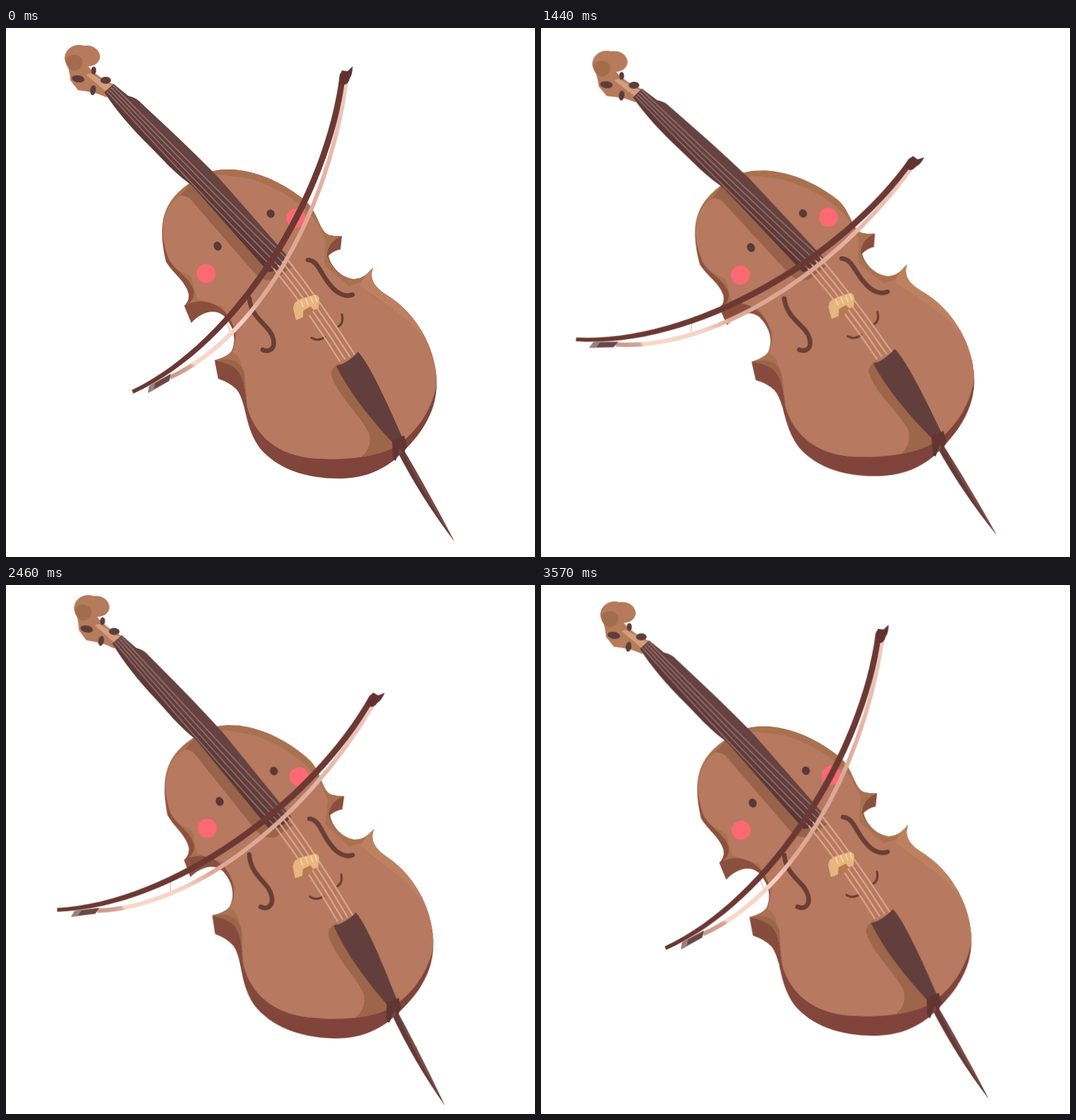
Recreate the animation shown at these times as an HTML page. Size 748 by 748 pixels, loop 3.6 s.

```html
<!DOCTYPE html>
<html lang="en">
<head>
<meta charset="utf-8">
<title>Cello</title>
<style>
  html, body { margin: 0; width: 100%; height: 100%; overflow: hidden; background: #fff; }
  svg { display: block; width: 100vw; height: 100vh; }
  #cello { transform-origin: 362px 382px; }
  #bow { transform-origin: 334px 285px; }
  .line { fill: none; stroke-linecap: round; }
</style>
</head>
<body>
<svg viewBox="0 0 748 748">
  <defs>
    <linearGradient id="hair" gradientUnits="userSpaceOnUse" x1="232" y1="494" x2="482" y2="80">
      <stop offset="0" stop-color="#c9988a"/>
      <stop offset=".06" stop-color="#d3a597"/>
      <stop offset=".07" stop-color="#f8d9c9"/>
      <stop offset=".25" stop-color="#f6d0c3"/>
      <stop offset=".33" stop-color="#dfa998"/>
      <stop offset=".6" stop-color="#dda795"/>
      <stop offset="1" stop-color="#f0cbc1"/>
    </linearGradient>
    <linearGradient id="side" x1="0" y1="0" x2=".6" y2="1">
      <stop offset="0" stop-color="#91573f"/>
      <stop offset="1" stop-color="#7f433b"/>
    </linearGradient>
    <linearGradient id="board" gradientUnits="userSpaceOnUse" x1="218" y1="190" x2="243" y2="165">
      <stop offset="0" stop-color="#593634"/>
      <stop offset="1" stop-color="#664340"/>
    </linearGradient>
    <clipPath id="plateClip"><use href="#plate"/></clipPath>
  </defs>

  <g id="cello">
    <!-- endpin -->
    <path fill="#633a38" d="M553 598L561 594Q600 660 634 726Q588 666 553 598Z"/>
    <path fill="#7d4a44" d="M560 596Q600 660 634 726Q596 667 560 596Z"/>

    <!-- ribs and front plate -->
    <path fill="url(#side)" d="M262 218C285 200 303 200 320 200C365 203 405 228 425 246C442 262 443 290 458 293
      Q467 295 475 294L473 313Q463 315 456 322C460 341 478 354 492 355C505 355 512 346 519 339
      C514 352 518 364 536 376C580 402 608 452 609 502C609 551 578 584 550 610C524 631 497 637 470 637
      C425 637 384 624 359 594C336 562 341 530 326 511Q316 501 300 496L295 470Q313 465 319 457
      C327 438 321 421 308 407C294 396 276 402 262 417L252 393Q260 385 258 375C253 357 235 346 226 330
      C216 285 216 248 262 218Z"/>
    <path id="plate" fill="#a9714f" d="M262 218C285 200 303 200 320 200C365 203 405 228 425 246C442 262 443 290 458 293
      Q467 295 475 294Q456 302 454 320C458 341 478 354 492 355C505 355 512 346 519 339
      C514 352 518 364 536 376C580 402 608 452 609 502C603 541 578 575 548 593C520 608 470 612 430 608
      C376 602 349 568 341 535C338 510 337 486 318 477Q308 472 295 470Q313 465 319 457
      C329 438 323 415 308 400C292 385 272 383 256 391Q268 383 265 370C258 350 237 343 229 324
      C216 285 216 248 262 218Z"/>
    <g clip-path="url(#plateClip)">
      <path fill="#b7795f" d="M247 237C225 250 220 275 222 305L234 337L262 352L270 383L307 394L327 430L321 459
        C333 465 337 482 335 508L340 620L500 625L620 560L612 470C596 430 565 406 534 389Q507 374 501 359
        L485 365L450 335L452 300L440 276C421 247 385 226 345 213L302 207Z"/>
      <path fill="#bd8160" d="M519 338Q505 352 501 363C528 390 563 399 591 440L575 395Z"/>
      <path fill="#99624a" d="M262 218L247 237Q258 236 266 248L350 345Q362 360 380 356L404 338L380 318Z"/>
      <path fill="#9d6549" d="M471 474Q457 482 461 494C474 526 501 548 513 572Q519 592 503 606L560 600L552 570Z"/>
      <path fill="#9c6548" d="M295 470Q330 463 337 488L341 535L318 490Z"/>
    </g>

    <!-- face -->
    <g fill="#583937">
      <ellipse cx="299" cy="308.500" rx="5.500" ry="6.500" transform="rotate(-25 299 308)"/>
      <ellipse cx="374" cy="262.500" rx="5.500" ry="6" transform="rotate(-25 374 262)"/>
    </g>
    <g fill="#fc6972"><circle cx="283" cy="347" r="13.500"/><circle cx="410" cy="269" r="13.500"/></g>
    <g class="line" stroke="#693e35">
      <path stroke-width="3" d="M432 438Q441 444 451 437M475 405Q478 417 470 422"/>
      <path stroke-width="6.500" d="M344 382C347 413 374 420 378 440C381 454 372 459 363 455M427 328C441 328 446 350 458 363C468 376 480 381 490 377"/>
    </g>

    <!-- scroll and pegs -->
    <path fill="#b57b5a" d="M84 44Q90 60 91 74L102 88Q125 90 142 98L154 81Q127 68 116 54Z"/>
    <path fill="#b57b5a" d="M83 45C82 29 97 21 110 25C123 23 133 31 133 41C132 51 122 55 114 54C105 63 88 62 83 45Z"/>
    <path fill="#a36c4c" d="M84 47C85 36 103 35 108 45C110 56 101 61 94 60Q86 57 84 47Z"/>
    <path fill="#d39d7f" d="M113 66L119 64L151 82L143 91Z"/>
    <g fill="#5d3d3b">
      <ellipse cx="102" cy="72" rx="9" ry="5" transform="rotate(8 102 72)"/>
      <ellipse cx="124" cy="60" rx="3.500" ry="5.500"/>
      <ellipse cx="141" cy="74" rx="7.500" ry="5"/>
      <ellipse cx="123" cy="88" rx="4" ry="7" transform="rotate(8 123 88)"/>
    </g>

    <!-- fingerboard, tailpiece, strings -->
    <path fill="url(#board)" d="M139 91L152 79L173 96Q184 98 192 107C232 144 266 176 300 211L401 326Q390 344 371 345
      L262 222C236 203 224 188 204 168Q163 128 139 91Z"/>
    <path fill="#623f3c" d="M467 478Q483 474 498 458C516 478 541 535 560 578L551 591C527 565 491 526 467 478Z"/>
    <g id="strings" class="line"></g>
    <path fill="#613632" d="M546 584L563 576L567 591L562 602L557 595L551 612L547 610Z"/>

    <!-- bridge -->
    <path fill="#e8b57f" d="M406 396Q407 386 417 383L437 377Q443 378 443 384L442 396L435 399L431 394L421 399L420 409L410 413Z"/>
    <path fill="#b77b50" d="M421 399L431 394L435 399L428 408L420 409Z"/>
    <path class="line" stroke="#f7d3a4" stroke-width="2" d="M417 386L420 394M424 383L427 391M431 381L434 389M437 379L440 387"/>
  </g>

  <g id="bow">
    <path class="line" stroke="#d9a394" d="M310 412L319 433"/>
    <path class="line" stroke="url(#hair)" stroke-width="6" style="stroke-linecap:butt" d="M232 494C350 440 453 272 481 78"/>
    <path fill="#694846" d="M203 506L233 489L231 499L201 516Z"/>
    <path fill="#9a807e" d="M202 507L211 502L209 512L201 516Z"/>
    <path fill="#6b3833" d="M178 512C324 443 452 234 472 65L480 68C460 238 332 449 180 517Z"/>
    <path fill="#613330" d="M472 66L475 60L483 61L490 54Q490 66 486 71Q484 80 478 80L471 78Z"/>
  </g>
</svg>
<script>
  const $ = id => document.getElementById(id);
  const LOOP = { duration: 3600, iterations: Infinity };

  // Four strings: muted over the fingerboard, bright from there to the tailpiece.
  let strings = "";
  for (let i = 0; i < 4; i++) {
    const nut = [143 + 3 * i, 90 - 2.7 * i];
    const end = [379 + 6 * i, 341 - 5 * i];
    const tail = [472 + 7 * i, 471 - 3.2 * i];
    strings += `<path stroke="#94706d" stroke-width="1.600" d="M${nut}Q${247 + 5 * i} ${205 - 4 * i} ${end}"/>`
             + `<path stroke="#dba68c" stroke-width="2.200" d="M${end}Q${429 + 6 * i} ${402 - 4 * i} ${tail}"/>`;
  }
  $("strings").innerHTML = strings;

  const swing = [0, 4.05, -5.65, 5.05, 0];
  const cello = $("cello").animate(swing.map(a => ({ transform: `rotate(${a}deg)` })), LOOP);

  const stroke = [[0, 0, 0], [-48.75, 33.75, 35.44], [0, 0, 0]];
  const bow = $("bow").animate(
    stroke.map(([x, y, a]) => ({ transform: `translate(${x}px, ${y}px) rotate(${a}deg)` })), LOOP);

  bow.startTime = cello.startTime = document.timeline.currentTime;
</script>
</body>
</html>
```
